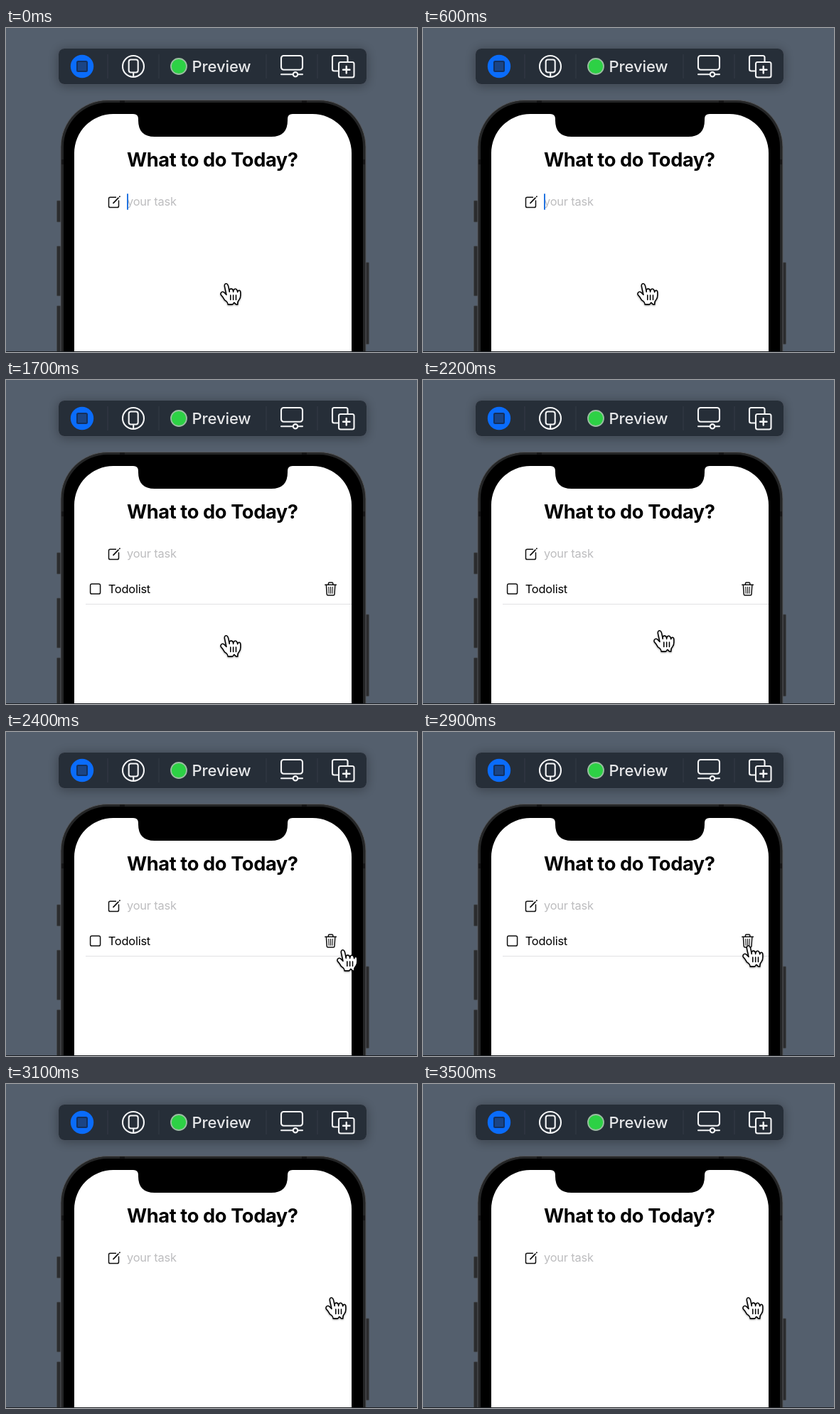
Recreate the animation shown at these times as an HTML page. Size 578x456 px, loop 3900 ms.

```html
<!DOCTYPE html>
<html lang="en">
<head>
<meta charset="utf-8">
<title>Todo list preview</title>
<style>
  html, body { margin: 0; width: 100%; height: 100%; overflow: hidden; background: #545f6d; }
  #stage { position: absolute; left: 0; top: 0; width: 578px; height: 456px; overflow: hidden; }
  svg { position: absolute; left: 0; top: 0; display: block; }
  text, .field { font-family: Inter, "Liberation Sans", sans-serif; }
  .body, .field { font-size: 16.4px; letter-spacing: -0.2px; }
  .title { font-size: 27.2px; font-weight: 700; letter-spacing: -0.37px; text-anchor: middle; }
  .label { font-size: 22px; font-weight: 500; letter-spacing: -0.1px; fill: #e6e7e9; }
  .tool { fill: none; stroke: #f4f5f6; stroke-width: 2.1; stroke-linecap: round; stroke-linejoin: round; }
  .tool .solid { fill: #262d37; }
  .ink { fill: none; stroke: #111; stroke-width: 1.5; stroke-linecap: round; stroke-linejoin: round; }
  .field { position: absolute; left: 170px; top: 233px; height: 23px; line-height: 23px; white-space: pre; color: #000; }
  #hint { color: #bdbdbf; }
  #caret { position: absolute; left: 100%; top: 0; width: 2.2px; height: 22.5px; background: #2374e1; border-radius: 1px; }
  #hand { filter: drop-shadow(0 1.5px 1.2px rgba(0, 0, 0, .4)); }
</style>
</head>
<body>
<div id="stage">
  <svg width="578" height="456" viewBox="0 0 578 456">
    <defs>
      <filter id="soft" x="-10%" y="-70%" width="120%" height="260%">
        <feDropShadow dx="0" dy="2" stdDeviation="8" flood-color="#000" flood-opacity=".34"/>
      </filter>
    </defs>
    <rect width="578" height="456" fill="#545f6d"/>

    <!-- toolbar -->
    <rect x="74" y="29" width="433" height="50" rx="8" fill="#262d37" filter="url(#soft)"/>
    <rect x="73.5" y="28.5" width="434" height="51" rx="8.5" fill="none" stroke="#4a535f"/>
    <path d="M143 37V71M215 37V71M366 37V71M438 37V71" stroke="#303741" stroke-width="1.5"/>
    <circle cx="107" cy="54" r="16.2" fill="#0a6cfb"/>
    <rect x="100" y="47" width="14" height="14" rx="1.5" fill="#1b4484" stroke="#13305f" stroke-width="2"/>
    <circle cx="243" cy="54" r="11" fill="#2dd145" stroke="#9bbda2" stroke-width="1.8"/>
    <text class="label" x="261.5" y="62">Preview</text>
    <g class="tool">
      <circle cx="179" cy="54" r="15"/>
      <rect x="172.7" y="44.5" width="13" height="18" rx="3"/>
      <path d="M179.2 63V68.5"/>
      <rect x="387" y="39" width="30" height="19.7" rx="3.5"/>
      <path d="M387 65.3H417"/>
      <circle class="solid" cx="407" cy="65.3" r="3.2"/>
      <rect x="459" y="39" width="21.5" height="21.5" rx="2.5"/>
      <rect class="solid" x="468" y="48" width="21.5" height="21.5" rx="2.5"/>
      <path d="M474 58.7H483.5M478.7 54V63.5" stroke-width="2.4"/>
    </g>

    <!-- phone -->
    <g fill="#2b2c2e" stroke="#46494d" stroke-width=".7">
      <rect x="71.5" y="243" width="6" height="30" rx="1"/>
      <rect x="71.5" y="307" width="6" height="70" rx="1"/>
      <rect x="71.5" y="391" width="6" height="80" rx="1"/>
      <rect x="505" y="330" width="5.5" height="115" rx="1"/>
    </g>
    <rect x="77" y="101.5" width="429" height="500" rx="66" fill="#242526" stroke="#55575a"/>
    <path d="M160 103.5H167M416 103.5H423M79.5 185V192M503.5 185V192" stroke="#161617" stroke-width="3"/>
    <rect x="81" y="105" width="421" height="500" rx="62"/>
    <path fill="#fff" d="M96 456V176A55 55 0 0 1 151 121H179Q186 121 186 128V130Q186 153 209 153H373Q396 153 396 130V128Q396 121 403 121H431A55 55 0 0 1 486 176V456Z"/>
    <text class="title" x="290.3" y="194.7">What to do Today?</text>
    <g class="ink">
      <path d="M154.5 238.3H146.6Q144.5 238.3 144.5 240.4V250.4Q144.5 252.5 146.6 252.5H156.4Q158.5 252.5 158.5 250.4V243"/>
      <path d="M151 246.3L158 239.2M159.7 237.4L160 237.1" stroke-width="1.8"/>
    </g>

    <!-- task row -->
    <g id="row">
      <rect id="glow" x="96" y="272" width="390" height="44" fill="#cacace"/>
      <path d="M112 315.5H486" stroke="#e1e1e4"/>
      <text class="body" x="143.7" y="300.3">Todolist</text>
      <g class="ink">
        <rect x="118.6" y="287.1" width="14" height="14" rx="2.2"/>
        <path d="M448.8 288.3H464.4M453.4 288V286.4Q453.4 285 454.8 285H458.4Q459.8 285 459.8 286.4V288"/>
        <path d="M450.4 288.6L451.2 301.4Q451.3 303 452.9 303H460.3Q461.9 303 462 301.4L462.8 288.6"/>
        <path d="M453.9 291.3L454.2 300.3M456.6 291.3V300.3M459.3 291.3L459 300.3" stroke-width="1.1"/>
      </g>
    </g>
    <rect y="455" width="578" height="1" fill="#1c1f23"/>
  </svg>

  <div class="field" id="hint">your task</div>
  <div class="field"><span id="typed"></span><i id="caret"></i></div>

  <svg width="578" height="456" viewBox="0 0 578 456">
    <g id="hand">
      <g transform="scale(1.93) translate(-7.95 -8)" stroke="#000" stroke-width=".8" stroke-linecap="round" stroke-linejoin="round">
        <path fill="#fff" d="M11.3 20.4L10.1 18.4L8.6 16.5C8.2 15.6 8.8 14.4 9.9 14.4C10.6 14.4 11.2 15 12.6 16.5L11.9 13.3L11.3 10.5C11.1 9.4 11.4 8.4 12.4 8.4C13.6 8.4 14 10 14.3 11.8L14.8 14.4C14.6 12.8 15.1 12.2 16 12.2C17.3 12.2 17.6 13.2 17.6 14.5C17.7 13 18.1 12.3 19.1 12.3C20.3 12.3 20.5 13.2 20.7 14.6C20.9 13.6 21.4 13.3 22 13.3C22.8 13.4 22.9 14.2 22.9 15.2V16.8C22.9 18.5 22.6 19.2 22 19.9C20.8 21.2 20.6 21.8 20.8 23.6C19.7 23.8 19.3 23.5 18.6 22.5C18.4 22.2 18.1 22.2 17.9 22.5C17.5 23.3 17.2 23.6 16.8 23.6H13.7C13.8 22.4 13.4 22 12.4 21.1Z"/>
        <path fill="none" d="M15.6 16.8V20.2M17.6 16.8V20.2M19.6 16.8V20.2"/>
      </g>
    </g>
  </svg>
</div>
<script>
  const LOOP = 3900, TICK = 100, WORD = "Todolist";
  const $ = id => document.getElementById(id);
  const keyTimes = [700, 800, 900, 1000, 1200, 1300, 1400, 1500];
  // [time, value...] entries hold until the next one
  const caretTrack = [[0, 1], [100, 0.45], [200, 0], [500, 0.5], [600, 1], [1600, 0]];
  const rowTrack = [[0, 0], [1600, 0.5], [1700, 1], [3100, 0]];
  const glowTrack = [[0, 0], [3000, 1], [3100, 0]];
  const handTrack = [[0, 301, 359], [2200, 324, 352], [2300, 412, 323], [2400, 465, 306],
                     [2500, 464, 305], [2600, 454, 302], [2700, 449, 300]];
  const held = (track, t) => track.filter(k => k[0] <= t).pop().slice(1);

  function draw() {
    const t = Math.floor(performance.now() % LOOP / TICK) * TICK;
    const count = t < 1600 ? keyTimes.filter(k => k <= t).length : 0;
    $("typed").textContent = WORD.slice(0, count);
    $("hint").style.opacity = count ? 0 : 1;
    $("caret").style.opacity = held(caretTrack, t)[0];
    $("row").style.opacity = held(rowTrack, t)[0];
    $("glow").style.opacity = held(glowTrack, t)[0];
    const [x, y] = held(handTrack, t);
    $("hand").setAttribute("transform", `translate(${x} ${y})`);
    requestAnimationFrame(draw);
  }
  draw();
</script>
</body>
</html>
```
